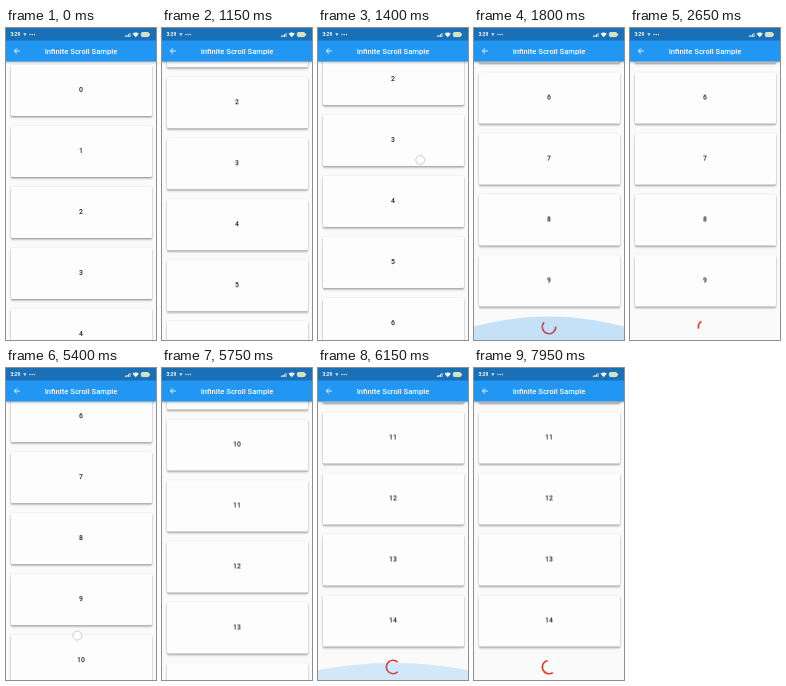
Animation of 150x312 px, one loop 8000 ms. Source, as an HTML page:

```html
<!DOCTYPE html>
<html lang="en">
<head>
<meta charset="utf-8">
<title>Infinite Scroll Sample</title>
<style>
html, body { margin: 0; width: 100%; height: 100%; overflow: hidden; background: #fafafa; }
body { position: relative; font-family: Roboto, "Open Sans", sans-serif; }
#list { position: absolute; left: 0; top: 0; width: 150px; will-change: transform; }
.card {
  position: absolute; left: 4.5px; width: 141px; height: 50.5px;
  border-radius: 1.2px; background: #fefdfe; color: #222;
  font-size: 6.9px; font-weight: 500; line-height: 50.5px; text-align: center;
  box-shadow: 0 1.6px 2px rgba(0,0,0,.3), 0 .4px 1.8px rgba(0,0,0,.2);
}
svg { position: absolute; left: 0; top: 0; }
#bar { filter: drop-shadow(0 1px 1px rgba(0,0,0,.28)); }
</style>
</head>
<body>
<div id="list"></div>
<svg width="150" height="312" viewBox="0 0 150 312">
  <path id="spin" fill="none" stroke="#e8352b" stroke-width="1.6"/>
  <ellipse id="glow" cx="75" rx="225" fill="#2196f3"/>
  <circle id="touch" r="4.5" fill="#fff" fill-opacity=".6" stroke="#b4c3d6" stroke-width=".8"/>
</svg>
<svg id="bar" width="150" height="36" viewBox="0 0 150 36">
  <rect width="150" height="33.5" fill="#2196f3"/>
  <rect width="150" height="12.5" fill="#1a70b7"/>
  <g fill="#fff">
    <text x="4.4" y="8.4" font-size="4.9" font-weight="700">3:29</text>
    <path d="M17.3 5.2h3.2l-1.6 3z" opacity=".8"/>
    <g opacity=".85"><circle cx="24" cy="6.5" r=".7"/><circle cx="26.2" cy="6.5" r=".7"/><circle cx="28.4" cy="6.5" r=".7"/></g>
    <path d="M119 9V7.8h1V9z M120.5 9V7h1v2z"/>
    <path id="signal" d="M122 9V6.1h1V9z M123.5 9V5h1v4z"/>
    <path d="M126.6 5.8q3.1-2.6 6.2 0L129.7 9.3z"/>
    <rect x="135.4" y="4.6" width="7.4" height="4" rx="1" fill="#d9e2a4" stroke="#fff" stroke-width=".7"/>
    <rect x="143.3" y="5.8" width=".8" height="1.6"/>
    <text x="75" y="25.9" font-size="7.63" font-weight="500" text-anchor="middle">Infinite Scroll Sample</text>
  </g>
  <path d="M13.8 23H8.4M11 20.3L8.3 23l2.7 2.7" fill="none" stroke="#fff" stroke-width=".9"/>
</svg>
<script>
const LOOP = 8000, PITCH = 61, LOADED = 4600;
const $ = id => document.getElementById(id);
const list = $('list'), spin = $('spin'), glow = $('glow'), touch = $('touch'), signal = $('signal');

const cards = Array.from({ length: 15 }, (_, i) => {
  const el = document.createElement('div');
  el.className = 'card';
  el.style.top = 37.2 + i * PITCH + 'px';
  el.textContent = i;
  list.append(el);
  return el;
});

const easeIn = p => u => u ** p;
const easeOut = p => u => 1 - (1 - u) ** p;
const clamp = u => Math.min(1, Math.max(0, u));

// start, end, scroll from, scroll to, easing, finger x and y on drags
const moves = [
  [400, 600, 0, 45, easeIn(2), 99, 230],
  [600, 1250, 45, 110, easeOut(3)],
  [1300, 1480, 110, 183, easeIn(2), 102.3, 155],
  [1480, 1720, 183, 358.5, easeOut(1.2)],
  [5300, 5480, 358.5, 426.5, easeIn(2), 71.3, 289],
  [5480, 5980, 426.5, 663.5, easeOut(1.6)]
];

function scrollAt(t) {
  let s = 0;
  for (const [a, b, from, to, ease] of moves)
    if (t >= a) s = from + (to - from) * ease(clamp((t - a) / (b - a)));
  return s;
}

// cubic-bezier(.4, 0, .2, 1)
function standard(x) {
  let lo = 0, hi = 1;
  for (let i = 0; i < 18; i++) {
    const m = (lo + hi) / 2, n = 1 - m;
    if (1.2 * m * n * n + .6 * m * m * n + m ** 3 < x) lo = m; else hi = m;
  }
  return 3 * lo * lo * (1 - lo) + lo ** 3;
}

function drawSpinner(ms, cy) {
  const n = Math.floor(ms / 1000), p = ms / 1000 - n;
  const head = standard(clamp(p * 2)), tail = standard(clamp(p * 2 - 1));
  const start = -90 + 270 * tail + 306 * p - 144 * n;
  const sweep = Math.max(270 * (head - tail), 1);
  const at = deg => {
    const r = deg * Math.PI / 180;
    return `${75 + 6.7 * Math.cos(r)} ${cy + 6.7 * Math.sin(r)}`;
  };
  spin.setAttribute('d', `M${at(start)}A6.7 6.7 0 ${sweep > 180 ? 1 : 0} 1 ${at(start + sweep)}`);
}

function drawGlow(ms, peak) {
  const k = ms < 60 ? clamp(ms / 60) : (1 - clamp((ms - 60) / 600)) ** 2;
  const s = peak * k;
  glow.setAttribute('ry', 225 * s);
  glow.setAttribute('cy', 312 + 195 * s);
  glow.setAttribute('opacity', .28 * k);
}

function drawTouch(t) {
  const drag = moves.find(m => m[5] && t >= m[0] && t < m[1]);
  touch.setAttribute('opacity', drag ? 1 : 0);
  if (!drag) return;
  touch.setAttribute('cx', drag[5]);
  touch.setAttribute('cy', drag[6] - scrollAt(t) + drag[2]);
}

function draw(t) {
  const s = scrollAt(t), second = t >= LOADED;
  list.style.transform = `translateY(${-s}px)`;
  cards.forEach((c, i) => c.style.visibility = i < 10 || second ? 'visible' : 'hidden');
  drawSpinner(Math.max(0, t - (second ? 5710 : 1520)), (second ? 962.5 : 657.5) - s);
  if (second) drawGlow(t - 5980, .85); else drawGlow(t - 1700, .9);
  drawTouch(t);
  signal.setAttribute('opacity', t > 3300 && t < 4750 ? .45 : .8);
}

function tick(now) {
  draw(now % LOOP);
  requestAnimationFrame(tick);
}
draw(0);
requestAnimationFrame(tick);
</script>
</body>
</html>
```
